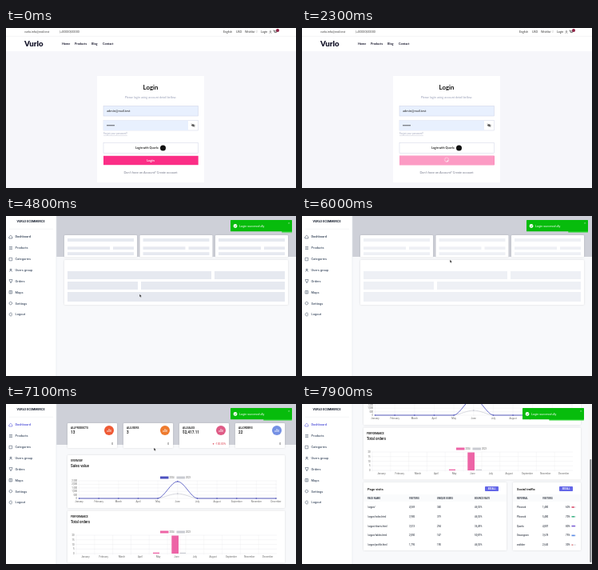
These frames come from a looping animation (363 by 200 pixels, 8 s). An HTML page:

```html
<!DOCTYPE html>
<html lang="en">
<head>
<meta charset="utf-8">
<title>Shop login and dashboard</title>
<style>
html, body { margin: 0; width: 100%; height: 100%; overflow: hidden; background: #fff; }
svg { display: block; width: 100vw; height: 100vh; }
text { font-family: Roboto, sans-serif; }
.shop text { font-family: Lato, sans-serif; }
.card { fill: #fff; filter: drop-shadow(0 .6px 1px #0002); }
.until-login, .loading, .shop, .admin, .skeleton, .report, .idle, .active, .cursor, .scrollbar {
  animation: 8s step-end infinite;
}
.shop { animation-name: shop; }
.admin { animation-name: admin; }
.until-login { animation-name: untilLogin; }
.loading { animation-name: loading; }
.skeleton, .idle { animation-name: skeleton; }
.report, .active { animation-name: report; }
.scrollbar { animation-name: scrollbar; }
.toast-place { animation: toastPlace 8s step-end infinite; }
.spin { animation: spin 1s linear infinite; transform-origin: 181px 164.5px; }
.pulse { animation: pulse 8s cubic-bezier(.4, 0, .6, 1) infinite; }
.toast { animation: toast 8s ease-out infinite; }
.timer { animation: timer 8s linear infinite; transform-origin: 358px 0; }
.route { animation: route 8s linear infinite; }
.scroll { animation: scroll 8s ease-in-out infinite; }
.thumb { animation: thumb 8s ease-in-out infinite; }
.grow { animation: grow 8s cubic-bezier(.25, 1, .5, 1) infinite; }
.cursor { animation-name: cursorShow; }
.move { animation: move 8s ease-in-out infinite; }
@keyframes shop { 0% { visibility: visible } 40%, to { visibility: hidden } }
@keyframes admin { 0% { visibility: hidden } 40%, to { visibility: visible } }
@keyframes untilLogin { 0% { opacity: 1 } 21.25%, to { opacity: 0 } }
@keyframes loading { 0% { opacity: 0 } 21.25%, to { opacity: 1 } }
@keyframes skeleton { 0% { opacity: 1 } 77.5%, to { opacity: 0 } }
@keyframes report { 0% { opacity: 0 } 77.5%, to { opacity: 1 } }
@keyframes scrollbar { 0% { opacity: 0 } 90%, to { opacity: 1 } }
@keyframes toastPlace { 0% { transform: none } 90%, to { transform: translateX(-5px) } }
@keyframes spin { to { transform: rotate(360deg) } }
@keyframes pulse { 0%, 40%, 65% { opacity: 1 } 52.5%, 77.5%, to { opacity: .5 } }
@keyframes toast { 0%, 40% { transform: translateX(85px) } 44%, to { transform: none } }
@keyframes timer { 0%, 44% { transform: scaleX(0) } 100% { transform: scaleX(.58) } }
@keyframes route { 0%, 40% { opacity: 1 } 45% { opacity: .7 } 47%, to { opacity: 0 } }
@keyframes scroll { 0%, 90% { transform: none } 98%, to { transform: translateY(-104px) } }
@keyframes thumb { 0%, 90% { transform: none } 98%, to { transform: translateY(68px) } }
@keyframes grow { 0%, 77.5% { transform: scaleY(0) } 88%, to { transform: none } }
@keyframes cursorShow { 0% { opacity: 0 } 50% { opacity: 1 } 90%, to { opacity: 0 } }
@keyframes move {
  0%, 50% { transform: translate(172px, 120px) }
  58%, 63% { transform: translate(168px, 99px) }
  74%, to { transform: translate(186px, 56px) }
}
</style>
</head>
<body>
<svg id="stage" viewBox="0 0 363 200"></svg>
<script>
const rect = (x1, y1, x2, y2, fill, extra = '') =>
  `<rect x="${x1}" y="${y1}" width="${x2 - x1}" height="${y2 - y1}" fill="${fill}" ${extra}/>`;
const text = (x, y, size, label, fill = '#222', extra = '') =>
  `<text x="${x}" y="${y}" font-size="${size}" fill="${fill}" ${extra}>${label}</text>`;
const path = (d, stroke, width = .5, extra = '') =>
  `<path d="${d}" fill="none" stroke="${stroke}" stroke-width="${width}" ${extra}/>`;
const circle = (x, y, r, fill, extra = '') => `<circle cx="${x}" cy="${y}" r="${r}" fill="${fill}" ${extra}/>`;
const group = (name, ...parts) => `<g class="${name}">${parts.flat(3).join('')}</g>`;
const card = (...box) => rect(...box, '#fff', 'class="card" rx="1"');
const bold = 'font-weight="700"', mid = 'text-anchor="middle"', end = 'text-anchor="end"';

function shop() {
  const ink = '#15152a', field = 'stroke="#cfd3e6" stroke-width=".5"';
  return group('shop',
    rect(0, 0, 363, 200, '#f6f6fa'), rect(0, 0, 363, 29, '#fff'),
    path('M0 10.3H363', '#e6e6ea'),
    text(23, 6.2, 3.6, 'vurlo.info@mail.test', '#444'), text(67, 6.2, 3.6, '(+00000)00000', '#444'),
    [[272, 'English'], [288, 'USD'], [299, 'Wishlist ♡'], [319, 'Login']].map(([x, s]) => text(x, 6.2, 3.5, s, '#333')),
    circle(331, 4.3, .8, 'none', 'stroke="#333" stroke-width=".4"'),
    path('M329.5 6.5q1.5-2 3 0', '#333', .4),
    path('M334.5 3h1l.7 2.6h2.2l.5-1.8h-3', '#222', .6), circle(340, 3, 2, '#8f2144'),
    text(23, 23, 9.6, 'Vurlo', ink, 'font-weight="900"'),
    [[70, 'Home'], [86, 'Products'], [107, 'Blog'], [121, 'Contact']].map(([x, s]) => text(x, 20.8, 3.8, s, ink, bold)),
    rect(114, 60, 248, 193, '#fff'),
    text(181, 77.3, 7.8, 'Login', '#111', `${bold} ${mid}`),
    text(181, 88, 3.7, 'Please login using account detail bellow.', '#9aa0b8', mid),
    rect(122, 97.3, 240.7, 110, '#e8f0fe', field), text(126, 105, 4.1, 'admin@mail.test'),
    rect(122, 115.5, 240.7, 128, '#fff', field), rect(122, 115.5, 228, 128, '#e8f0fe'),
    [0, 1, 2, 3, 4].map(i => circle(127 + i * 2, 121.8, .7, '#222')),
    path('M232 121.7q2.2-2.6 4.4 0q-2.2 2.6-4.4 0M232.2 119.6l4 4.2', '#222', .6), circle(234.2, 121.7, .8, '#222'),
    text(122, 133, 3, 'Forgot your password?', '#a4a9be', 'text-decoration="underline"'),
    rect(122, 143.5, 240.7, 156.5, '#fff', field),
    text(162, 151.2, 3.6, 'Login with Quorla', '#222', bold), circle(196.5, 150, 3.5, '#111'),
    rect(122, 159.8, 240.7, 171.2, '#fb2e86'),
    group('until-login', text(181, 167, 4, 'Login', '#fff', `${bold} ${mid}`)),
    group('loading', rect(122, 159.8, 240.7, 171.2, '#fc9bc4'),
      group('spin', circle(181, 164.5, 2.5, 'none', 'stroke="#fff8" stroke-width=".8"'),
        path('M181 162a2.5 2.5 0 0 1 2.5 2.5', '#fff', .9))),
    text(181, 182, 3.9, "Don't have an Account? Create account", '#777b8c', `${mid} text-decoration="underline"`));
}

function sidebar() {
  const icons = ['M3.8 26l2-1.8 2 1.8v2h-4z', 'M4 38.5h4M4 40h4M4 41.5h4', 'M4 52.2h3.6v3.6H4z',
    'M4 69.5q2-3 4 0M5 66.3h2v1.2H5z', 'M4 79.5h4l-.8 2.8H5zM5 83.3h2', 'M4 93.5h3.6v3.5H4zM5.8 93.5v3.5',
    'M5.8 107.2l1.7 1v1.8l-1.7 1-1.7-1v-1.8z', 'M7.5 121.6a2 2 0 1 0 0 2.8M6 123h2.3'];
  const items = ['Dashboard', 'Products', 'Categories', 'Users group', 'Orders', 'Maps', 'Settings', 'Logout'];
  return [
    rect(0, 0, 63, 200, '#fff'), path('M63 0V200', '#e3e6ec', .6),
    text(31, 8, 3.7, 'VURLO ECOMMERCE', '#182030', `${bold} ${mid}`),
    path('M4 16.3H59', '#e5e7eb', .4),
    items.map((s, i) => {
      const item = color => path(icons[i], color, .55) + text(11.5, 27.4 + i * 13.85, 4, s, color, 'font-weight="500"');
      return i ? item('#475569') : group('idle', item('#334155')) + group('active', item('#4f50d8'));
    })];
}

function skeleton() {
  const bar = (...box) => rect(...box, '#e1e5ee');
  const cards = [73, 167.5, 262];
  return group('skeleton',
    cards.map(x => card(x, 24, x + 91, 51.5)), card(73, 55, 353, 111),
    group('pulse',
      cards.map(x => [bar(x + 4, 28, x + 87, 32), bar(x + 4, 38.3, x + 57, 42), bar(x + 61, 38.3, x + 87, 42),
        bar(x + 4, 45.2, x + 87, 49)]),
      bar(77, 69, 257, 79), bar(261, 69, 349, 79), bar(77, 82, 165, 92), bar(169, 82, 349, 92), bar(77, 95, 349, 107)));
}

function stats() {
  return [['ALLPRODUCTS', '13', '#ef5a35'], ['ALLUSERS', '3', '#ee7b2f'],
    ['ALLSALES', '$2,417.11', '#df5b86'], ['ALLORDERS', '22', '#7590e4']].map(([name, value, color], i) => {
    const x = 77 + i * 70;
    return [card(x, 24, x + 62, 55),
      text(x + 4, 31, 3.2, name, '#222', bold), text(x + 4, 37, 4.6, value, '#222', bold),
      circle(x + 52, 33, 6, color), path(`M${x + 50} 35v-2m2 2v-4m2 4v-3`, '#fff', .8),
      i === 2 ? text(x + 58, 50.7, 3.2, '▼ -100.00%', '#dc4050', end) : text(x + 57, 50.7, 3.2, '0', '#333', end)];
  });
}

const months = ['January', 'February', 'March', 'April', 'May', 'June', 'July', 'August', 'September', 'November', 'December'];

function chart(top, height, kicker, title, color, legendY, plotTop, plotBottom, left, ticks, monthX, monthY) {
  const rowY = i => plotTop + (plotBottom - plotTop) * i / (ticks.length - 1);
  return [card(77, top, 349, top + height),
    text(81, top + 8, 3, kicker, '#222', bold), text(81, top + 15, 4.5, title, '#111', 'font-weight="500"'),
    [[193, color, '2024'], [213.5, '#c9cbd2', '2023']].map(([x, fill, year]) =>
      rect(x, legendY - 1.5, x + 10.5, legendY + 1.5, fill) + text(x + 11.5, legendY + 1, 2.7, year, '#666')),
    ticks.map((s, i) => path(`M${left - 1.5} ${rowY(i)}H339`, '#e4e4e8', .35) + text(left - 2.3, rowY(i) + 1, 2.8, s, '#666', end)),
    months.map((s, i) => path(`M${monthX(i, true)} ${plotTop}V${plotBottom + 1.5}`, '#e9e9ed', .35) +
      text(monthX(i), monthY, 2.9, s, '#666', mid))];
}

function charts() {
  const lineX = i => 91.5 + i * 24.65, barX = (i, edge) => 88 + (i + (edge ? 0 : .5)) * 22.82;
  const line = (peak, color, width) => {
    const x = lineX(5), y = 118 - peak;
    return path(`M${lineX(0)} 118H${lineX(4)}C${lineX(4) + 8} 117 ${x - 8} ${y} ${x} ${y}S${lineX(6) - 8} 117 ${lineX(6)} 118H${lineX(10)}`, color, width) +
      months.map((_, i) => circle(lineX(i), i === 5 ? y : 118, .8, color)).join('');
  };
  const grow = (base, ...parts) => `<g class="grow" style="transform-origin:0 ${base}px">${parts.join('')}</g>`;
  return [
    chart(64, 66, 'OVERVIEW', 'Sales value', '#4c51bf', 92, 96, 118, 91.5,
      ['2,500', '2,000', '1,500', '1,000', '500', '0'], lineX, 122.8),
    grow(118, line(6, '#c3c5ce', .6), line(21.2, '#5a5fc4', .9)),
    chart(133.5, 65, 'PERFORMANCE', 'Total orders', '#ed64a6', 160, 164, 187, 88, ['20', '15', '10', '5', '0'], barX, 192),
    grow(187, rect(184, 185.7, 192, 187, '#ed64a6'), rect(207.3, 164.5, 216, 187, '#ed64a6'), rect(217.5, 185.8, 225, 187, '#c9cbd2'))];
}

function table(left, right, title, columns, heads, rows) {
  const row = (cells, y, extra) => cells.map((s, i) => text(columns[i], y, 2.9, s, '#3a404c', extra));
  return [card(left, 202, right, 287),
    text(left + 5, 211.5, 4, title, '#222', bold),
    rect(right - 27, 207, right - 10, 213, '#6366e8', 'rx=".8"'),
    text(right - 18.5, 211, 2.6, 'SEE ALL', '#fff', `${bold} ${mid}`),
    rect(left, 217, right, 226, '#fafbfc'),
    row(heads, 223, bold),
    rows.map((cells, i) => row(cells, 234 + i * 11.8, 'font-weight="500"'))];
}

function tables() {
  const colors = ['#e0526f', '#45b98a', '#8062d8', '#5b8de8', '#e88a8a'], share = [60, 70, 80, 75, 30];
  return [
    table(77, 256, 'Page visits', [82, 134, 169, 216], ['PAGE NAME', 'VISITORS', 'UNIQUE USERS', 'BOUNCE RATE'], [
      ['/argon/', '4,569', '340', '46,53%'], ['/argon/index.html', '3,985', '319', '46,53%'],
      ['/argon/charts.html', '3,513', '294', '36,49%'], ['/argon/tables.html', '2,050', '147', '50,87%'],
      ['/argon/profile.html', '1,795', '190', '46,53%']]),
    table(264, 349, 'Social traffic', [269, 301, 330], ['REFERRAL', 'VISITORS'], [
      ['Plinvook', '1,480', '60%'], ['Plinvook', '5,480', '70%'], ['Quorla', '4,807', '80%'],
      ['Snavogram', '3,678', '75%'], ['zwibber', '2,645', '30%']]),
    share.map((p, i) => {
      const y = 232.2 + i * 11.8;
      return rect(337.5, y, 343, y + 1.6, '#e5e7eb') + rect(337.5, y, 337.5 + 5.5 * p / 100, y + 1.6, colors[i]);
    })];
}

function toast() {
  return group('toast-place', group('toast',
    rect(281, 5, 358, 19.3, '#07bc0c', 'rx=".6"'),
    `<g class="timer">${rect(281, 19, 358, 20.5, '#20cf25')}</g>`,
    circle(287, 12.5, 2.4, '#fff'), path('M285.8 12.6l.9.9 1.6-1.9', '#07bc0c', .6),
    text(292, 14, 3.8, 'Login successfully', '#fff'),
    path('M353.3 8l1.8 1.8m0-1.8l-1.8 1.8', '#c5f0c7', .4)));
}

document.getElementById('stage').innerHTML = shop() + group('admin',
  rect(0, 0, 363, 200, '#f8f9fb'),
  group('scroll', rect(63, 0, 363, 51, '#ced0d8'), skeleton(), group('report', stats(), charts(), tables())),
  sidebar(),
  group('route', rect(0, 0, 363, .8, '#f3a9c4')),
  group('scrollbar', rect(358.5, 0, 363, 200, '#f7f7f8'), group('thumb', rect(360.3, 1, 362.3, 130, '#808286', 'rx="1"'))),
  toast(),
  group('cursor', group('move', '<path d="M-.8-1.3v3.6l.9-.8.6 1.3.6-.3-.6-1.2h1.1z" fill="#111" stroke="#fff" stroke-width=".25"/>')));
</script>
</body>
</html>
```
